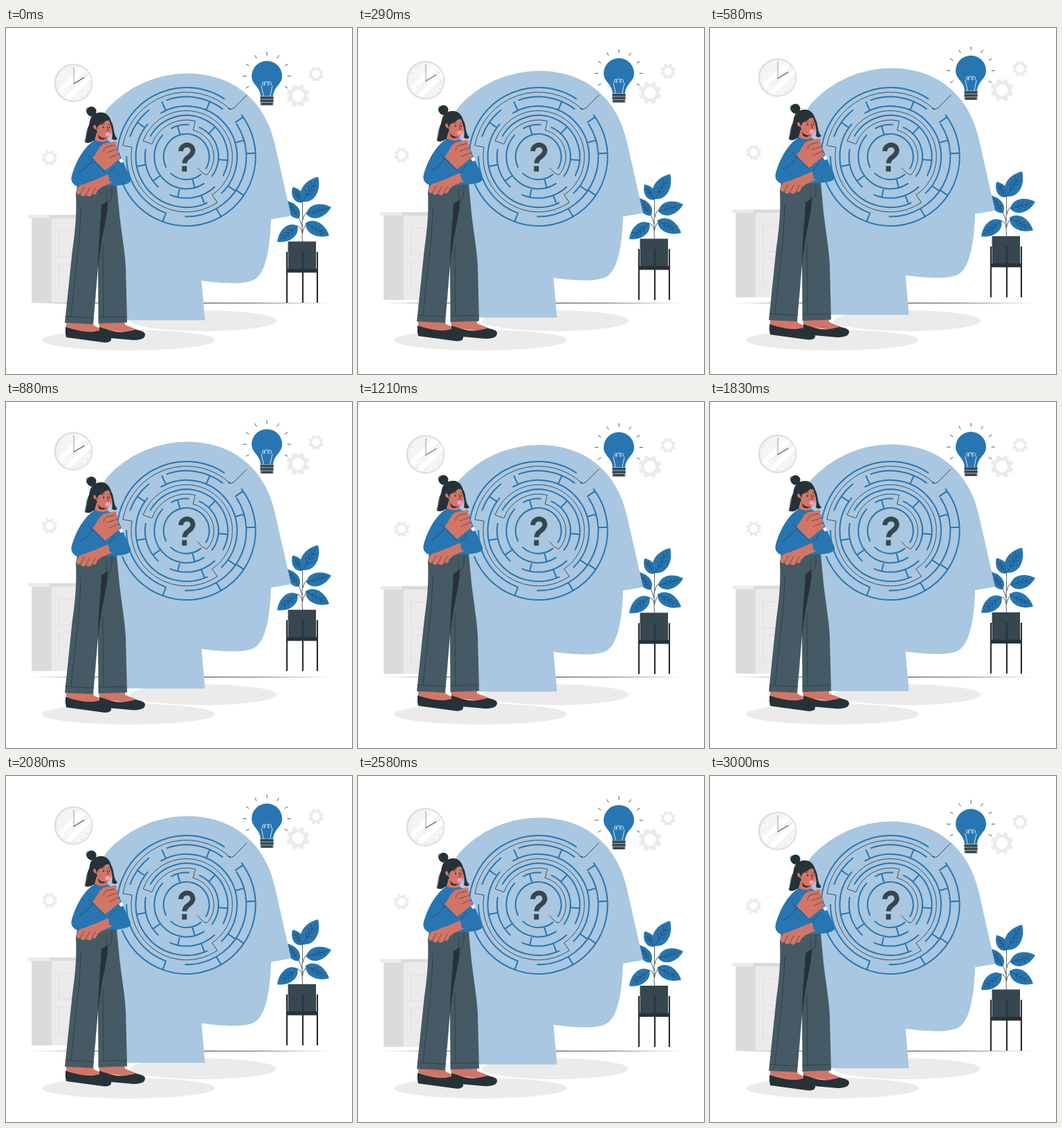
Write an HTML page that moves like this. It is 500 by 500 pixels and loops after 3.04 s.

```html
<!DOCTYPE html>
<html lang="en">
<head>
<meta charset="utf-8">
<title>Thinking</title>
<style>
html, body { margin: 0; width: 100%; height: 100%; overflow: hidden; background: #fff; }
svg { display: block; width: 100%; height: 100%; }
.line { fill: none; stroke-linecap: round; stroke-linejoin: round; }
.blue { fill: #2776b2; }
.skin { fill: #d37566; }
.ink { fill: #263238; }
.slate { fill: #37474f; }
.inkline { stroke: #263238; stroke-width: .8; }
.fine { stroke-width: .6; }
</style>
</head>
<body>
<svg viewBox="0 0 500 500">
  <path class="ink" d="M37 397.5Q250 396.4 467 397.5Q250 398.7 37 397.5"/>
  <g fill="#ebebeb">
    <ellipse cx="285" cy="423" rx="106" ry="15"/>
    <ellipse cx="177" cy="451" rx="125" ry="15"/>
  </g>

  <g id="scene">
    <!-- cabinet -->
    <path d="M66 275H130V397H66ZM32 270H64V275H32Z" fill="#ebebeb"/>
    <path d="M37 275H66V397H37ZM63 270H135V275H63Z" fill="#dbdbdb"/>
    <path class="line" d="M77 293H125V331H77ZM77 341.5H125V380H77Z" stroke="#dedede"/>

    <!-- clock -->
    <circle cx="97.5" cy="79.5" r="28" fill="#e0e0e0"/>
    <circle cx="98" cy="79.5" r="25.5" fill="#f5f5f5"/>
    <path d="M75 90L109 57L116 62L80 98ZM84 101L121 67L123 74L92 104Z" fill="#fff"/>
    <circle cx="98" cy="80" r="22.5" class="line" stroke="#c7c7c7" pathLength="120" stroke-dasharray=".6 9.4"/>
    <path class="line" d="M98 81V57" stroke="#78868c" stroke-width=".8"/>
    <path class="line" d="M98 80.5L113 71.5" stroke="#455a64" stroke-width="1.1"/>
    <path class="line" d="M98 80L84 90" stroke="#c7c7c7" stroke-width=".6"/>

    <g id="gears" fill="none" stroke="#ebebeb"></g>

    <!-- bulb -->
    <g transform="translate(0 .5)">
      <path id="rays" class="line inkline"/>
      <path class="blue" d="M355 69a22 22 0 0 1 44 0C399 81 387 84 386 98H368C367 84 355 81 355 69Z"/>
      <path class="line" d="M369 83L372.5 99M385 83L381.5 99M371 82C368 76 376 76 374 82C372 85 372 76 377 77C382 78 380 86 378 81C378 75 386 77 383 82" stroke="#fff" stroke-width=".8"/>
      <path d="M367.5 98H386.5V111H367.5Z" fill="#a7b0b4"/>
      <path class="slate" d="M367.5 98.5H386.5V102H367.5ZM367.5 103H386.5V106.500H367.5ZM368.500 107.500H385.500V111H368.500Z"/>
    </g>

    <!-- plant -->
    <path class="line inkline" d="M428.5 309C427 290 429 275 428.5 249M429 277Q430 268 438 264M428 287Q424 273 418 266M428.5 296Q430 283 440 283M428.5 296Q427 286 418 286"/>
    <g id="leaves"></g>
    <path class="slate" d="M407.5 308.5H448V349H407.5Z"/>
    <path class="ink" d="M405 348H451V353.5H405ZM404.800 323.5H407V397H404.800ZM427.800 323.5H430V397H427.800ZM448.800 323.5H451V397H448.800Z"/>

    <!-- big head -->
    <path fill="#a9c7e0" d="M165 422.300H287.5L282.500 365C305 368 341 372 358 364C377 355 382 311 383 276.500L412 271.500L389 170C376 107 330 65.800 262 65.800A157 157 0 0 0 146 117C128 142 133 170 142 200C153 245 163 330 165 422.300Z"/>
  </g>

  <path id="walls" class="line" stroke="#2776b2" stroke-width="2"/>
  <path id="trail" class="line inkline"/>
  <path class="line" d="M252.500 178C253.500 166 270 166 270 177.500C270 186 258 186 258 195.500" stroke="#37474f" stroke-width="7" style="stroke-linecap:butt"/>
  <path class="slate" d="M254.300 199.500H261.300V207.500H254.300Z"/>

  <g id="woman">
    <!-- feet -->
    <path class="skin" d="M87 424H125L127 430L142 437L138 443L87 438ZM134 423H172V429L190 436L184 441L135 435Z"/>
    <path class="ink" d="M135 432C147 436 160 441 173 439C181 438 185 436 188 436C194 437 201 439 201 443C201 449 194 451 184 451L150 448L135 441ZM86 432C95 435 112 440 126 439C134 438 137 436 141 436C147 439 152 443 152 449C152 453 149 454.500 142 454.500L87 447Q85 440 86 432Z"/>
    <!-- trousers -->
    <path fill="#455a64" d="M103 227H160L164 270C169 310 172 325 173 345L175 425.500L133.500 427L133 345L126 428L85 426L95.500 325C101 287 102 267 101 239Z"/>
    <path class="ink" d="M138 256L147 250C147 277 139 288 133 348C133 313 137 282 138 256Z"/>
    <path class="line inkline fine" d="M86 417L127 419M134 418L174 417M108 260C107 316 98 370 94 417M140 315L141 417M153 229C153 241 153 250 148 251C144 251 145 242 146 235"/>
    <!-- hair behind the face -->
    <path class="ink" d="M122 135C117 145 117 156 114 165Q120 168 126 163L134 163V140Z"/>
    <circle class="ink" cx="123.500" cy="120.500" r="7"/>
    <path class="line inkline" d="M118 115C113 119 119 127 124 128M122 139C113 150 118 157 114 163"/>
    <!-- neck and shirt -->
    <path class="skin" d="M131 151L147 155V170L126 169Z"/>
    <path class="ink" d="M133 153L146 158Q140 164 134 159Z"/>
    <path class="blue" d="M129 162Q138 167 147 163L160 170C164 184 175 205 180 218C182 224 173 227 158 228L103 229C96 226 93 220 95 214C101 191 115 169 129 162Z"/>
    <!-- face -->
    <path class="skin" d="M130 138C126 135 124 142 128 146L131 147C132 154 136 160 144 159C151 158 154 151 152 143L149 132H135Z"/>
    <path class="ink" d="M121 143C119 131 126 122 136 122C144 121 150 127 152 135C157 142 154 153 161 160Q157 164 153 160C155 152 152 142 149 134C146 133 144 134 141 137C137 140 132 139 132 147L129 140Q124 140 126 148Z"/>
    <path class="line inkline" d="M138 140L142 138.500M148 139L150 140M146 142L148 148L146 148.500"/>
    <path class="ink" d="M140 142.500h2v2h-2ZM148.500 142.500h1.500v2h-1.500Z"/>
    <ellipse cx="147" cy="153.500" rx="3.800" ry="3" fill="#ff98c5" transform="rotate(-12 147 153.500)"/>
    <!-- lower arm -->
    <path class="skin" d="M151 210L125 221C114 222 105 226 102 234C101 239 104 243 108 239C108 245 114 244 116 240C117 246 123 244 125 239C127 243 131 240 132 235L138 230L156 222Z"/>
    <path class="line inkline fine" d="M108 239L113 230M116 240L121 231M125 239L129 231"/>
    <path class="blue" d="M147 209L167 192C173 203 178 212 180 219C181 225 166 226 150 222Z"/>
    <!-- raised arm -->
    <path class="blue" d="M110 181L122 188L142 207C130 219 114 228 102 227C94 224 94 218 96 211Z"/>
    <path class="line inkline fine" d="M119 184L143 208M157 200L148 211M126 189Q118 202 106 208"/>
    <path class="skin" d="M125 188C132 180 135 169 142 167L157 164C161 164 161 168 157 169C163 169 163 174 158 176C164 176 164 181 160 183C166 183 167 188 162 191C157 194 153 199 143 206Z"/>
    <path class="line inkline fine" d="M157 169L145 172Q141 174 141 179M158 176L147 180M160 183L149 188"/>
    <path d="M163 191L167 188L170 193L166 195Z" fill="#fff"/>
  </g>
</svg>
<script>
const $ = id => document.getElementById(id);
const polar = (r, deg, cx = 260.7, cy = 186) => {
  const a = deg * Math.PI / 180;
  return `${cx + r * Math.cos(a)} ${cy + r * Math.sin(a)}`;
};
const arcTo = (r, from, to) =>
  `A${r} ${r} 0 ${+(Math.abs(to - from) > 180)} ${+(to > from)} ${polar(r, to)}`;
const line = (r1, r2, a, cx, cy) => `M${polar(r1, a, cx, cy)}L${polar(r2, a, cx, cy)}`;

// Maze: evenly spaced rings, outermost first. The trail turns inward at each
// ring's door; further gaps and the spokes reaching outward are given by angle.
const STEP = 13.4, OUTER = 100, GAP = 20;
const rings = [
  { door: 313, gaps: [168], spokes: [] },
  { door: 190, gaps: [101, 241, 317], spokes: [-35, -3, 34, 60, 110] },
  { door: 56, gaps: [230], spokes: [-16, 35, 215, 246, 293] },
  { door: -160, gaps: [37, 123], spokes: [69, 169] },
  { door: -76, gaps: [47, 232], spokes: [-46, 5, 102, 144] },
  { door: 41, gaps: [143], spokes: [75, 254] }
];

let walls = '', trail = 'M348 97L329 116Q325 119 321 116';
rings.forEach(({ door, gaps, spokes }, i) => {
  const r = OUTER - STEP * i;
  const open = [door, ...gaps].map(a => (a + 360) % 360).sort((a, b) => a - b);
  open.forEach((a, k) => {
    const next = k + 1 < open.length ? open[k + 1] : open[0] + 360;
    const from = a + GAP / 2, to = next - GAP / 2;
    if (to > from) walls += `M${polar(r, from)}${arcTo(r, from, to)}`;
  });
  for (const a of spokes) walls += line(r, r + STEP, a);

  const next = rings[i + 1], lane = r - STEP / 2;
  if (next) trail += `L${polar(lane, door)}${arcTo(lane, door, next.door)}`;
});
$('walls').setAttribute('d', walls);
$('trail').setAttribute('d', trail + 'Q286 213 277 202');

let rays = '';
for (let a = 150; a <= 390; a += 30) rays += line(30, 34.5, a, 377, 69);
$('rays').setAttribute('d', rays);

const gear = (x, y, s) => `<g transform="translate(${x} ${y}) scale(${s}) rotate(11)">
  <circle r="10.8" stroke-width="5"/>
  <circle r="14.5" stroke-width="4" pathLength="16" stroke-dasharray="1.1 .9"/></g>`;
$('gears').innerHTML = gear(422, 97.5, 1) + gear(448, 66.5, .68) + gear(63, 187.5, .68);

// Leaf from its base to its tip, w = half width of the control hull
function leaf(x, y, tipX, tipY, w) {
  const len = Math.hypot(tipX - x, tipY - y);
  const turn = Math.atan2(tipY - y, tipX - x) * 180 / Math.PI;
  let veins = `M0 0H${len * .85}`;
  for (let k = .25; k < .7; k += .17) {
    veins += `M${len * (k + .15)} ${-w * .36}L${len * k} 0L${len * (k + .15)} ${w * .36}`;
  }
  return `<g transform="translate(${x} ${y}) rotate(${turn})">
    <path class="blue" d="M0 0C${len * .15} ${-w} ${len * .65} ${-w} ${len} 0C${len * .65} ${w} ${len * .15} ${w} 0 0"/>
    <path class="line inkline" style="stroke-width:.45" d="${veins}"/></g>`;
}
$('leaves').innerHTML = leaf(429, 251, 451, 215, 15) + leaf(428, 252, 414, 230, 10) +
  leaf(434, 269, 470, 259, 13) + leaf(423, 275, 407, 250, 10) +
  leaf(433, 282, 467, 300, 13) + leaf(421, 286, 392, 309, 13);

// Triangle wave: up 10 px and back at constant speed
const lift = (t, period) => -10 * (1 - Math.abs(1 - 2 * (t % period) / period));
const moveY = (id, y) => $(id).setAttribute('transform', `translate(0 ${y})`);

const start = performance.now();
function draw() {
  const t = (performance.now() - start) % 3040;
  const step = Math.floor((t + 4) * 24 / 1000) / 24; // 24 pictures a second
  moveY('scene', lift(step, 1.5));
  moveY('woman', lift(step, 3));
  requestAnimationFrame(draw);
}
draw();
</script>
</body>
</html>
```
